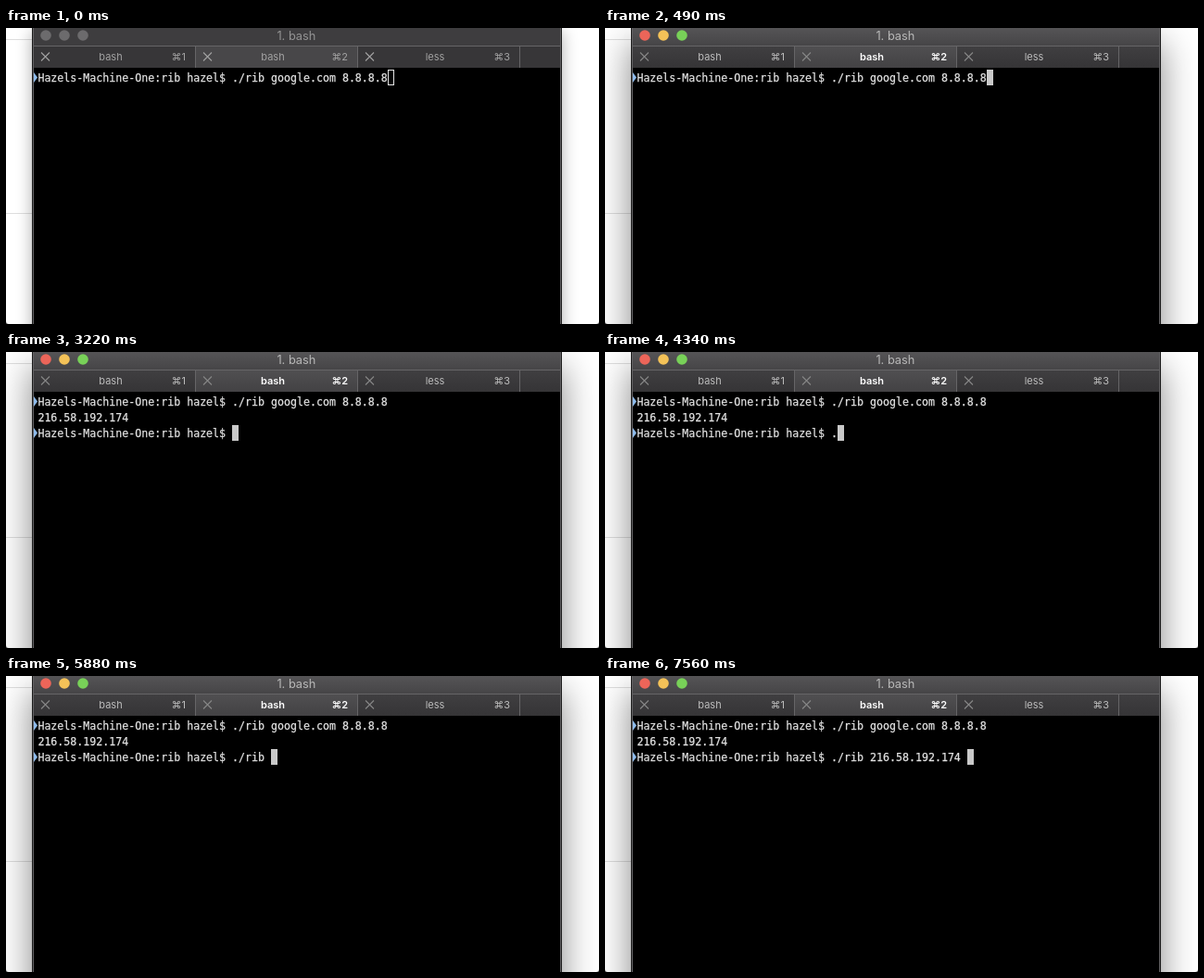
An HTML page that plays this animation: 640x320 px, repeating every 8 s.

```html
<!DOCTYPE html>
<html lang="en">
<head>
<meta charset="utf-8">
<title>Terminal</title>
<style>
html, body { margin: 0; width: 100%; height: 100%; overflow: hidden; background: #fff; }
#stage { position: relative; width: 640px; height: 320px; overflow: hidden; background: #fff; }
#stage i { position: absolute; left: 0; width: 28px; height: 1px; background: #dedede; }
#shadow { position: absolute; left: 28px; top: -1px; width: 572px; height: 460px; background: #000;
  box-shadow: 0 5px 16px rgba(0,0,0,.32); }
.on #shadow { box-shadow: 0 18px 36px rgba(0,0,0,.48); }
svg { position: absolute; left: 0; top: 0; }
.ui { font-family: Inter, Roboto, "DejaVu Sans", sans-serif; font-size: 11px; fill: #a2a2a2; }
.on .ui { fill: #bcbcbc; }
.ui .title { font-size: 12.8px; fill: #949494; }
.on .title { fill: #b8b8b8; }
.on .sel { fill: #fff; font-weight: 600; }
.cross { stroke: #a0a0a0; stroke-width: 1.1; }
.on .cross { stroke: #868686; }
.light { fill: #6c6b6d; }
.on .light { fill: var(--c); }
.bar { fill: #3e3d3f; }
.on .bar { fill: url(#barOn); }
.strip { fill: #373638; }
.on .strip { fill: url(#stripOn); }
.tab { fill: #484749; }
.on .tab { fill: url(#tabOn); }
.term { font: 11.627px "DejaVu Sans Mono", "Liberation Mono", monospace; fill: #e2e2e2; white-space: pre; }
.term text { stroke: #e2e2e2; stroke-width: .25; }
</style>
</head>
<body>
<div id="stage">
  <i style="top:12px"></i><i style="top:200px"></i>
  <div id="shadow"></div>
  <svg width="640" height="320" viewBox="0 0 640 320">
    <defs>
      <linearGradient id="barOn" x2="0" y2="1">
        <stop stop-color="#555456"/><stop offset="1" stop-color="#464547"/>
      </linearGradient>
      <linearGradient id="stripOn" x2="0" y2="1">
        <stop stop-color="#403f41"/><stop offset="1" stop-color="#353436"/>
      </linearGradient>
      <linearGradient id="tabOn" x2="0" y2="1">
        <stop stop-color="#504f51"/><stop offset="1" stop-color="#434244"/>
      </linearGradient>
    </defs>
    <rect x="28" width="572" height="320" fill="#000"/>
    <rect class="bar" x="29" width="570" height="19"/>
    <rect class="strip" x="29" y="20" width="570" height="23"/>
    <rect class="tab" x="205" y="20" width="174" height="23"/>
    <path d="M29 19.5H599M204.5 20V43M379.5 20V43M554.5 20V43" stroke="#666567" fill="none"/>
    <path d="M28.5 0V320M599.5 0V320" stroke="#1c1c1c"/>
    <path d="M29.5 0V320M598.5 0V320" stroke="#626163"/>
    <g id="ui" class="ui"></g>
    <g id="term" class="term"></g>
    <rect id="cursor" width="7" height="17"/>
    <path d="M0 317V320H3Q0 320 0 317M640 317V320H637Q640 320 640 317" fill="#444"/>
  </svg>
</div>
<script>
const $ = id => document.getElementById(id);
const NS = "http://www.w3.org/2000/svg";

function add(parent, tag, attrs, text) {
  const el = document.createElementNS(NS, tag);
  for (const k in attrs) el.setAttribute(k, attrs[k]);
  if (text) el.textContent = text;
  return parent.appendChild(el);
}

// Window chrome
const ui = $("ui");
["#ec6559", "#f4c258", "#78d158"].forEach((c, i) =>
  add(ui, "circle", { class: "light", cx: 43 + 20 * i, cy: 8, r: 5.8, style: `--c:${c}` }));
add(ui, "text", { class: "title", x: 313.4, y: 13, "text-anchor": "middle" }, "1. bash");
["bash", "bash", "less"].forEach((name, i) => {
  const x = 175 * i, cls = i === 1 ? "sel" : "";
  add(ui, "path", { class: "cross", d: `M${x + 38} 26.5l9 9m0 -9l-9 9` });
  add(ui, "text", { class: cls, x: x + 113, y: 35, "text-anchor": "middle" }, name);
  add(ui, "text", { class: cls, x: x + 194, y: 35, "text-anchor": "end" }, "⌘" + (i + 1));
});

// Terminal rows
const COL = 7, ROW = 17, LEFT = 34, TOP = 45;
const rows = [0, 1, 2].map(i => ({
  text: add($("term"), "text", { x: LEFT + 0.4, y: TOP + 13 + ROW * i, "xml:space": "preserve" }),
  mark: add($("term"), "path", { d: `M30 ${TOP + 3 + ROW * i}l4 5.5l-4 5.5z`, fill: "#8fbcec" })
}));

const LOOP = 8000;
const PROMPT = "Hazels-Machine-One:rib hazel$ ";
const FIRST = PROMPT + "./rib google.com 8.8.8.8";
const IP = "216.58.192.174";
const FOCUS = 490, ENTER = 1190, REPLY = 1750;
const typed = [
  [4270, "."], [4550, "./"], [4830, "./r"], [4970, "./ri"], [5320, "./rib "],
  [6510, "./rib " + IP], [7280, "./rib " + IP + " "]
];

function linesAt(t) {
  if (t < ENTER) return [FIRST];
  if (t < REPLY) return [FIRST, ""];
  const step = typed.filter(s => s[0] <= t).pop();
  return [FIRST, IP, PROMPT + (step ? step[1] : "")];
}

const cursor = $("cursor");
function draw(t) {
  const lines = linesAt(t), last = lines.length - 1, on = t >= FOCUS;
  $("stage").className = on ? "on" : "";
  rows.forEach((row, i) => {
    const s = lines[i] || "";
    if (row.text.textContent !== s) row.text.textContent = s;
    row.mark.style.display = s.startsWith(PROMPT) ? "" : "none";
  });
  // A window without focus has a hollow cursor
  const inset = on ? 0 : 0.5;
  const box = {
    x: LEFT + COL * lines[last].length + inset, y: TOP + ROW * last + inset,
    width: COL - 2 * inset, height: ROW - 2 * inset,
    fill: on ? "#c9c9c9" : "none", stroke: on ? "none" : "#e6e6e6"
  };
  for (const k in box) cursor.setAttribute(k, box[k]);
}

const start = performance.now();
function tick() {
  draw((performance.now() - start) % LOOP);
  requestAnimationFrame(tick);
}
tick();
</script>
</body>
</html>
```
